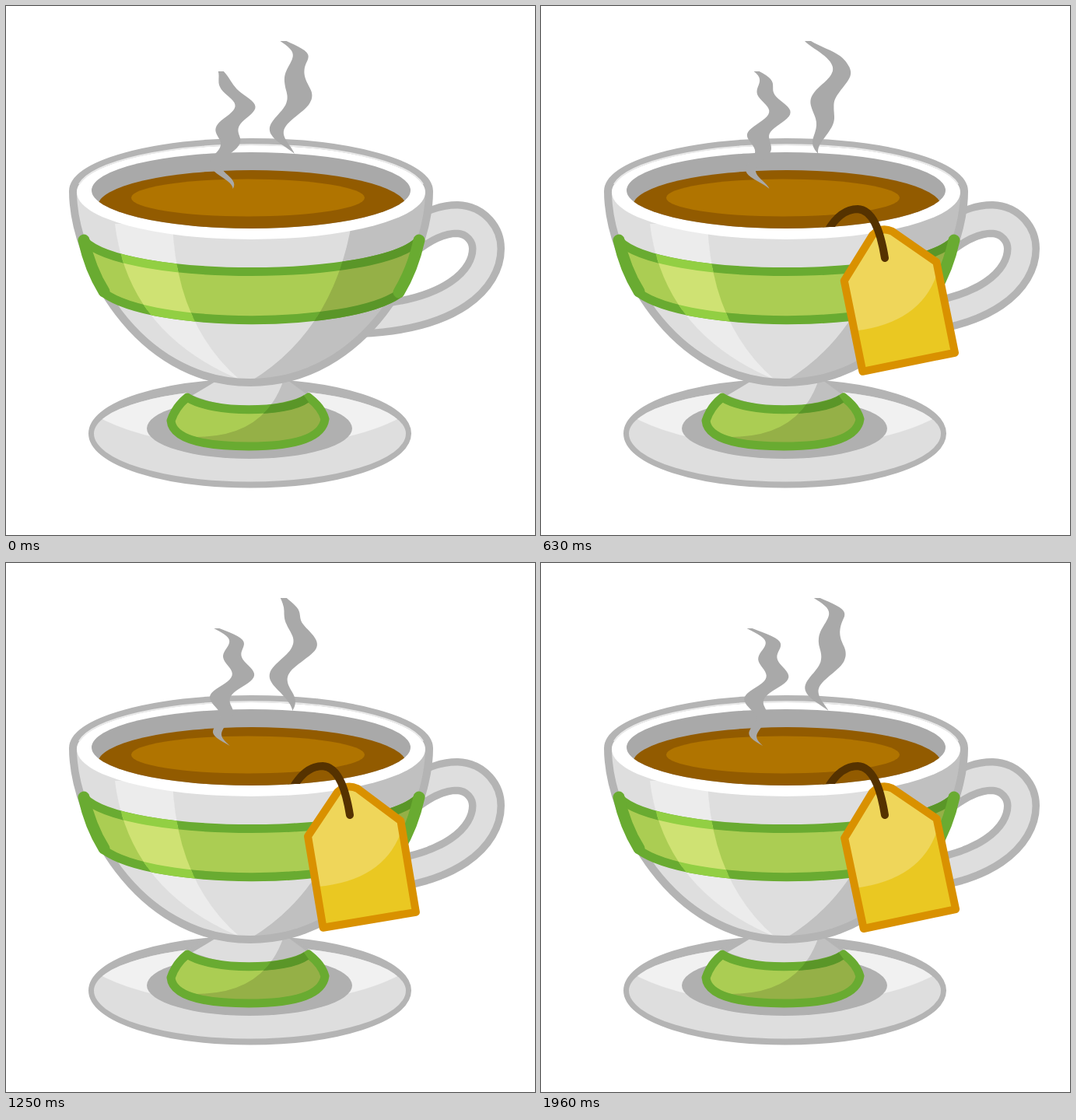
Animation of 680x680 px, one loop 2000 ms. Source, as an HTML page:

```html
<!DOCTYPE html>
<html lang="en">
<head>
<meta charset="utf-8">
<title>Cup of tea</title>
<style>
html, body { margin: 0; width: 100%; height: 100%; overflow: hidden; background: #fff; }
svg { display: block; width: 100vw; height: 100vh; }
</style>
</head>
<body>
<svg viewBox="0 0 680 680" fill="none" stroke-linejoin="round">
  <defs>
    <path id="body" d="M86,238A229,63 0 0 1 544,238C544,326 464,484 314,484C166,484 86,326 86,238Z"/>
    <path id="band" stroke-width="11" d="M100,301C150,355 480,355 531,301Q523,338 505,370C440,415 190,415 126,369Q108,338 100,301Z"/>
    <path id="foot" stroke-width="11" d="M233,503C265,524 360,524 389,503Q406,516 410,531Q405,566 312,566Q215,566 212,533Q218,515 233,503Z"/>
    <path id="neck" d="M268,480L233,501Q313,535 389,501L358,478Z"/>
    <path id="handle" d="M515,302C545,278 565,274 580,274C605,275 618,295 618,312C618,350 575,398 455,403"/>
    <path id="label" d="M-60,38L-13,-12Q0,-21 13,-12L61,38V157H-60Z"/>
    <ellipse id="plate" cx="313.5" cy="549.5" rx="202.5" ry="65"/>
    <ellipse id="mouth" cx="315" cy="237" rx="205" ry="49"/>
    <clipPath id="inPlate"><path d="M113,549.5A200.5,57 0 0 1 514,549.5A200.5,62 0 0 1 113,549.5Z"/></clipPath>
    <clipPath id="inMouth"><use href="#mouth"/></clipPath>
    <clipPath id="light"><path d="M140,280Q157,420 300,480Q219,410 214,280Z"/></clipPath>
    <clipPath id="shade"><path d="M451,200Q449,400 315,482L400,500L580,400V200Z"/></clipPath>
    <clipPath id="footShade"><path d="M225,553Q330,562 357,480H430V590H225Z"/></clipPath>
    <clipPath id="overLip"><path d="M0,0H680V680H400V284H0Z"/></clipPath>
  </defs>

  <!-- saucer -->
  <use href="#plate" fill="#b4b4b4" stroke="#b4b4b4" stroke-width="10"/>
  <g clip-path="url(#inPlate)">
    <path d="M100,470H527V640H100Z" fill="#dedede"/>
    <path d="M100,517Q170,566 313,566T527,517V470H100Z" fill="#f1f1f1"/>
  </g>
  <ellipse cx="313" cy="543" rx="132" ry="39" fill="#b0b0b0"/>

  <!-- pedestal -->
  <use href="#neck" fill="#dedede" stroke="#b4b4b4" stroke-width="6"/>
  <use href="#neck" fill="#c0c0c0" clip-path="url(#footShade)"/>
  <use href="#foot" fill="#abcd53"/>
  <use href="#foot" fill="#95b047" clip-path="url(#footShade)"/>
  <use href="#foot" stroke="#69ab31"/>
  <path d="M233,503C265,524 360,524 386,505" stroke="#5a9628" stroke-width="11" clip-path="url(#footShade)"/>

  <!-- handle -->
  <use href="#handle" stroke="#b4b4b4" stroke-width="46"/>
  <use href="#handle" stroke="#dedede" stroke-width="27"/>

  <!-- cup -->
  <use href="#body" fill="#dedede"/>
  <use href="#body" fill="#ececec" clip-path="url(#light)"/>
  <use href="#body" fill="#c0c0c0" clip-path="url(#shade)"/>
  <use href="#body" stroke="#b4b4b4" stroke-width="10"/>
  <use href="#band" fill="#abcd53" stroke="#69ab31"/>
  <use href="#band" fill="#cfe273" stroke="#92cf43" clip-path="url(#light)"/>
  <use href="#band" fill="#95b047" stroke="#5a9628" clip-path="url(#shade)"/>
  <path d="M531,301Q523,338 505,368M100,301Q108,338 126,367" stroke="#69ab31" stroke-width="15" stroke-linecap="round"/>
  <ellipse cx="315" cy="239.5" rx="224" ry="60.5" fill="#fff"/>
  <path d="M94,229A224,60.5 0 0 1 536,229" stroke="#e9e9e9" stroke-width="2"/>
  <use href="#mouth" fill="#a9a9a9"/>
  <g clip-path="url(#inMouth)">
    <ellipse cx="316" cy="257" rx="198" ry="46" fill="#925b00"/>
    <ellipse cx="311" cy="246.5" rx="150" ry="24" fill="#b07400"/>
  </g>

  <g fill="#a9a9a9">
    <path id="steamL"/>
    <path id="steamR"/>
  </g>

  <g id="tag">
    <use href="#label" fill="#eac822"/>
    <path d="M-58,104Q25,110 58,54V38L13,-12H-13L-58,38Z" fill="#efd65a"/>
    <use href="#label" stroke="#d99100" stroke-width="10"/>
  </g>
  <g clip-path="url(#overLip)">
    <path id="string" d="M368,290C383,264 398,261 407,261C426,262 436,287 442,324" pathLength="1"
      stroke="#553200" stroke-width="10" stroke-linecap="round" stroke-dasharray="1 2"/>
  </g>
</svg>
<script>
const el = id => document.getElementById(id);
const clamp = v => Math.min(1, Math.max(0, v));
const TAU = 2 * Math.PI;

// Rest line (mid) and thickness (width) at even steps from top to bottom.
const plumes = [
  { id: 'steamL', top: 84, bottom: 235, wave: 50, period: .75, lag: .9, amp: 7.8,
    mid: [270, 290, 298, 299.5, 294.5, 285, 278, 276, 279, 286],
    width: [7, 18, 23, 27, 29, 28, 21, 14, 11, 0] },
  { id: 'steamR', top: 45, bottom: 190, wave: 71, period: 1, lag: .13, amp: 8,
    mid: [351, 371.5, 377.5, 379, 375, 367, 359.5, 356, 358, 364],
    width: [8, 19, 21, 27, 32, 30, 25, 19, 12, 0] }
];

// Catmull-Rom value at u in 0..1
function spline(p, u) {
  const x = u * (p.length - 1), i = Math.min(Math.floor(x), p.length - 2), f = x - i;
  const b = p[i], c = p[i + 1], a = p[i - 1] ?? 2 * b - c, d = p[i + 2] ?? 2 * c - b;
  return b + f / 2 * (c - a + f * (2 * a - 5 * b + 4 * c - d + f * (3 * (b - c) + d - a)));
}

function drawSteam(s, time) {
  const left = [], right = [], n = 60, height = s.bottom - s.top;
  for (let i = 0; i <= n; i++) {
    const u = i / n, y = s.top + u * height;
    const x = spline(s.mid, u) + s.amp * Math.cos(TAU * (time / s.period + u * height / s.wave - s.lag));
    const half = Math.max(0, spline(s.width, u)) / 2;
    left.push(`${(x - half).toFixed(1)},${y.toFixed(1)}`);
    right.unshift(`${(x + half).toFixed(1)},${y.toFixed(1)}`);
  }
  el(s.id).setAttribute('d', `M${left.join('L')}L${right.join('L')}Z`);
}

function draw(now) {
  const step = Math.floor((now % 2000 + 3.4) * .024) % 48;  // 24 steps a second
  plumes.forEach(s => drawSteam(s, step / 24));

  const thread = clamp((step - 1) / 5);
  el('string').style.strokeDashoffset = 1 - thread;
  el('string').style.visibility = thread ? 'visible' : 'hidden';

  const scale = 1 - (1 - clamp((step - 6) / 8)) ** 2.3;
  const swing = -9.8 - 2.9 * Math.cos(TAU * (step - 24.6) / 20) - 48 * (1 - clamp((step - 6) / 13)) ** 2;
  el('tag').setAttribute('transform', `translate(441 304) rotate(${swing}) scale(${scale})`);
  el('tag').style.visibility = scale ? 'visible' : 'hidden';
}

const start = performance.now();
function loop() {
  draw(performance.now() - start);
  requestAnimationFrame(loop);
}
loop();
</script>
</body>
</html>
```
